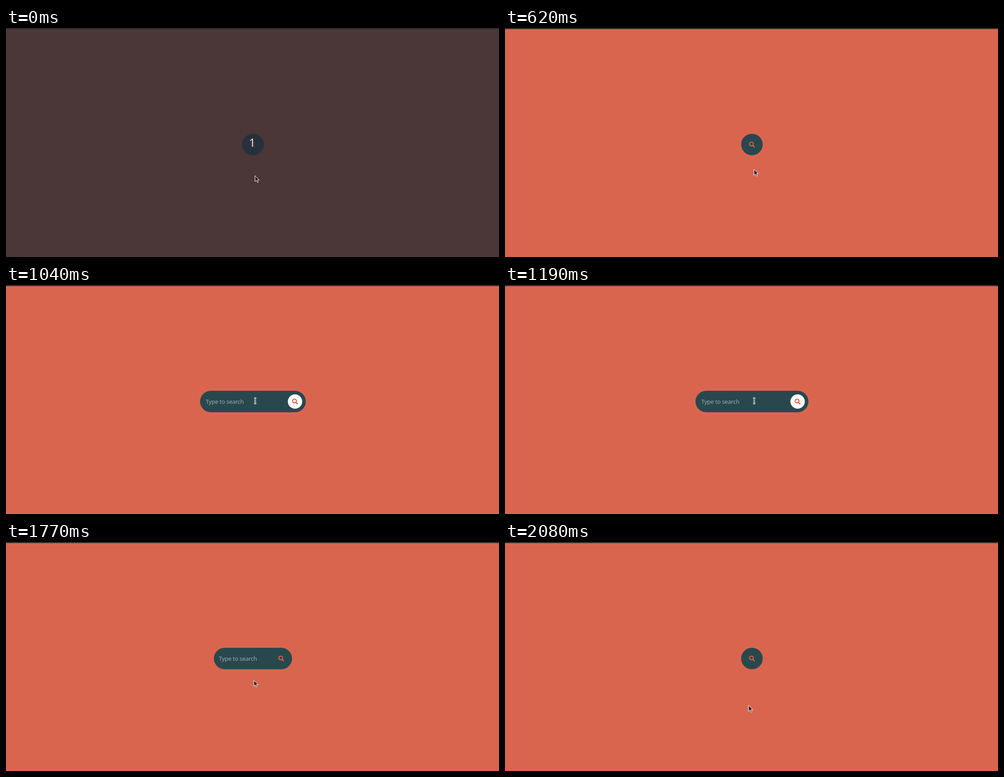
These frames come from a looping animation (1096 by 511 pixels, 2730 ms). An HTML page:

```html
<!DOCTYPE html>
<html lang="en">
<head>
<meta charset="utf-8">
<title>Expanding search box</title>
<style>
  html, body { margin: 0; width: 100%; height: 100%; overflow: hidden; background: #da654f; }
  svg { display: block; }
  .hint { font: 13px "Noto Sans", "Open Sans", sans-serif; letter-spacing: -.27px; fill: #9ca9ab; }
  .count { font: 26px "Open Sans", "Noto Sans", sans-serif; fill: #e9e7e5; text-anchor: middle; }
</style>
</head>
<body>
<svg width="1096" height="511" viewBox="0 0 1096 511">
  <defs>
    <clipPath id="field"><rect id="fieldBox" y="244" height="32"/></clipPath>
  </defs>
  <rect id="page" width="1096" height="511"/>
  <rect width="1096" height="2" fill="#272a2e"/>
  <rect id="edge" y="2" width="1096" height="1" fill="#272a2e" opacity=".35"/>
  <rect id="pill" y="236" height="48" rx="24"/>
  <g clip-path="url(#field)"><text id="hint" class="hint" y="264.5">Type to search</text></g>
  <g id="button">
    <circle id="disc" r="16" fill="#fff"/>
    <g id="icon" fill="none">
      <circle cx="-1.2" cy="-1.2" r="4.27" stroke-width="2.05"/>
      <path d="M2 2L5.3 5.3" stroke-width="2.4" stroke-linecap="round"/>
    </g>
  </g>
  <text id="count" class="count" x="547.5" y="265">1</text>
  <path id="arrow" d="M0 0V13.2L3.2 10.4L5.4 15.2L7.6 14.2L5.5 9.5H9.4Z" fill="#24262a" stroke="#fff" stroke-linejoin="round"/>
  <g id="beam" fill="none">
    <path d="M-2.5 -6H-1L0 -5L1 -6H2.5M0 -5V5M-2.5 6H-1L0 5L1 6H2.5" stroke="#fff" stroke-width="3"/>
    <path d="M-2.5 -6H-1L0 -5L1 -6H2.5M0 -5V5M-2.5 6H-1L0 5L1 6H2.5" stroke="#24262a"/>
  </g>
</svg>
<script>
const LOOP = 2730, CENTER = 549, GROW = 203, FADE = 400;
const OPEN = 776, CLOSE = 1675, INTRO = 40;
const ticks = [0, 40, 620, 690, 730, 780, 820, 870, 910, 950, 1000, 1040, 1080, 1120, 1150, 1190,
  1620, 1650, 1690, 1730, 1770, 1810, 1850, 1890, 1930, 1960, 2000, 2040, 2080];
// time, x, y of the pointer
const track = [[40, 553.5, 329.5], [620, 553.5, 315.5], [780, 553.5, 283], [890, 554, 264], [1040, 554, 258.5],
  [1190, 554, 258.5], [1620, 553, 258], [1690, 552, 280], [1770, 551, 308.5], [1890, 546.5, 340], [2000, 542.5, 359], [2080, 541.5, 364.5]];

const $ = id => document.getElementById(id);
const set = (id, attrs) => { for (const k in attrs) $(id).setAttribute(k, attrs[k]); };
const show = (id, on) => set(id, { visibility: on ? "visible" : "hidden" });

// cubic-bezier(.25, .1, .25, 1)
function ease(x) {
  if (x <= 0) return 0;
  if (x >= 1) return 1;
  const bez = (a, b, u) => 3 * a * u * (1 - u) ** 2 + 3 * b * u * u * (1 - u) + u ** 3;
  let lo = 0, hi = 1;
  for (let i = 0; i < 24; i++) {
    const mid = (lo + hi) / 2;
    if (bez(.25, .25, mid) < x) lo = mid; else hi = mid;
  }
  return bez(.1, 1, lo);
}

function pointer(t) {
  if (t < 620) return track[0].slice(1);
  const i = track.findIndex(k => k[0] > t);
  if (i < 0) return track[track.length - 1].slice(1);
  const a = track[i - 1], b = track[i], f = (t - a[0]) / (b[0] - a[0]);
  return [a[1] + (b[1] - a[1]) * f, a[2] + (b[2] - a[2]) * f];
}

function draw(t) {
  const intro = t < INTRO, hover = t >= OPEN && t < CLOSE;
  const p = ease((t - OPEN) / FADE) - ease((t - CLOSE) / FADE);
  const width = 48 + GROW * p, left = CENTER - width / 2;
  const textX = left + 8 + 4.8 * p;

  set("page", { fill: intro ? "#4b3638" : "#da654f" });
  show("edge", !intro);
  show("count", intro);
  set("pill", { x: left, width, fill: intro ? "#26313b" : "#28484e" });
  set("hint", { x: textX });
  set("fieldBox", { x: textX, width: (GROW - 9.6) * p });
  set("button", { transform: `translate(${left + width - 24} 260)` });
  show("disc", hover);
  set("icon", { stroke: intro ? "#493438" : hover ? "#dc4f38" : "#df614c" });

  const [x, y] = pointer(t), typing = t >= 850 && t < 1620;
  show("arrow", !typing);
  show("beam", typing);
  set(typing ? "beam" : "arrow", { transform: `translate(${x} ${y})` });
}

const start = performance.now();
function frame() {
  const t = (performance.now() - start) % LOOP;
  draw(ticks.filter(k => k <= t).pop() || 0);
  requestAnimationFrame(frame);
}
frame();
</script>
</body>
</html>
```
